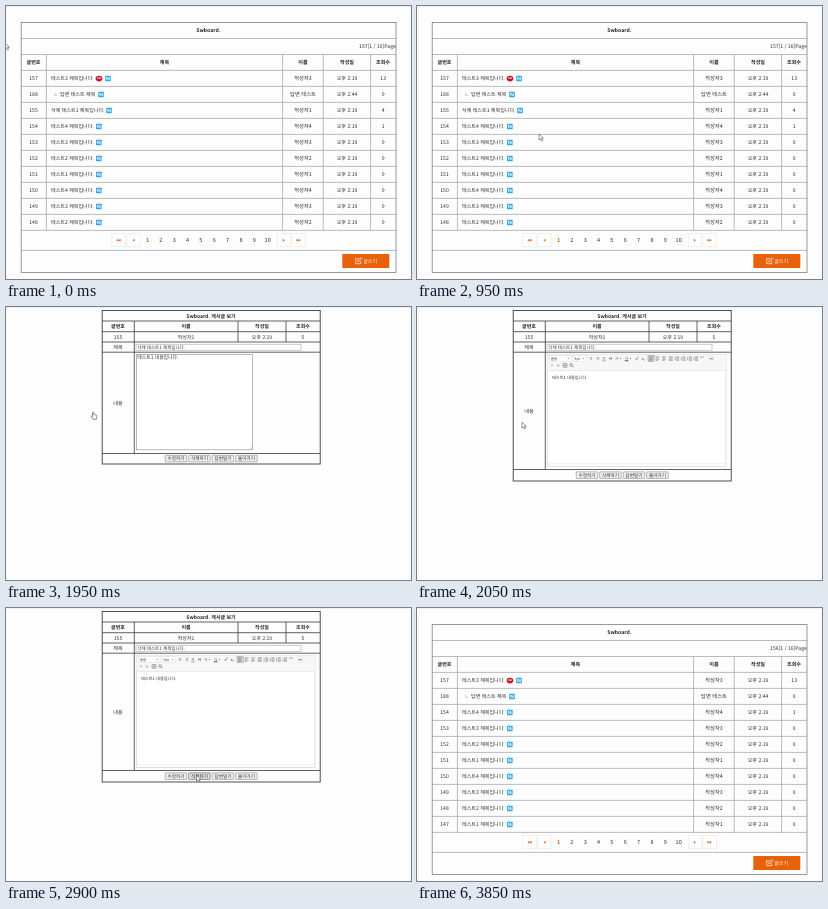
An HTML page for the animation above (4650 ms loop, 405x273 px).

```html
<!DOCTYPE html>
<html lang="ko">
<head>
<meta charset="utf-8">
<title>Board</title>
<style>
html, body { margin: 0; width: 100%; height: 100%; overflow: hidden; background: #fdfdfe; }
svg { display: block; width: 100vw; height: 100vh; }
text { font-family: 'Noto Sans CJK KR', 'Noto Sans CJK JP', 'Noto Sans', sans-serif; text-rendering: geometricPrecision; white-space: pre; }
</style>
</head>
<body>
<svg id="stage" viewBox="0 0 405 273" xmlns="http://www.w3.org/2000/svg"></svg>
<script>
const LOOP = 4650, STEP = 50;
const ORANGE = '#e8620c', INK = '#2e2e2e', GRID = '#a6a6a6', DARK = '#3c3c3c';
const svg = document.getElementById('stage');

const rect = (x, y, w, h, fill, stroke = 'none', extra = '') =>
  `<rect x="${x}" y="${y}" width="${w}" height="${h}" fill="${fill}" stroke="${stroke}" ${extra}/>`;
const path = (d, stroke, width = 0.7, fill = 'none') =>
  `<path d="${d}" stroke="${stroke}" stroke-width="${width}" fill="${fill}"/>`;
const text = (x, y, s, { size = 5.1, fill = INK, anchor = 'middle', weight = 400 } = {}) =>
  `<text x="${x}" y="${y + size * 0.36}" font-size="${size}" fill="${fill}" text-anchor="${anchor}" font-weight="${weight}">${s}</text>`;
const left = (x, y, s, size = 5.05) => text(x, y, s, { size, anchor: 'start' });
const bold = (x, y, s, size = 5.1) => text(x, y, s, { size, weight: 700, fill: '#222' });
const hLines = (x1, x2, ys) => ys.map(y => `M${x1} ${y}H${x2}`).join('');
const vLines = (y1, y2, xs) => xs.map(x => `M${x} ${y1}V${y2}`).join('');

// List page
const newBadge = (x, y) => rect(x - 2.8, y - 2.5, 5.6, 5.6, '#35a8e6', 'none', 'rx="0.5"') +
  path(`M${x - 1.2} ${y + 1.7}v-2.9l2.4 2.9v-2.9`, '#fff', 0.8);
const hotBadge = (x, y) => `<ellipse cx="${x}" cy="${y + 0.4}" rx="3.4" ry="2.8" fill="#c4142c"/>` +
  text(x, y + 0.3, 'Hot', { size: 2.6, fill: '#fff', weight: 700 });

const plainPost = (id, n, views = 0) =>
  ({ id, title: `테스트${n} 제목입니다.`, author: `작성자${n}`, time: '2:19', views, badge: 92.8 });
const posts = [
  { ...plainPost(157, 3, 13), hot: true, badge: 102 },
  { id: 188, title: '답변 테스트 제목', author: '답변 테스트', time: '2:44', views: 0, reply: true, badge: 95 },
  { ...plainPost(155, 1, 4), title: '삭제 테스트1 제목입니다.', badge: 103 },
  plainPost(154, 4, 1),
  ...[3, 2, 1, 4, 3, 2, 1].map((n, i) => plainPost(153 - i, n))
];

function postRow(p, i) {
  const y = 72.2 + i * 16;
  let out = text(27.5, y, p.id) + left(p.reply ? 54 : 45, y, p.title) + newBadge(p.badge, y);
  if (p.hot) out += hotBadge(93, y);
  if (p.reply) out += path(`M48.7 ${y - 1.2}v2.4h2.6`, '#999', 0.5);
  return out + text(297, y, p.author, { size: 5.3 }) + text(341, y, `오후 ${p.time}`) + text(377.2, y, p.views);
}

function pager() {
  const arrow = (x, dir) => `M${x + dir} 234.2l${-dir * 2} -1.5v3z`;
  const button = (x, dir, count) => {
    const d = count > 1 ? arrow(x - 1.1, dir) + arrow(x + 1.1, dir) : arrow(x, dir);
    return rect(x - 6.6, 227.4, 13.2, 13.4, '#fff', '#e6e6e6', 'stroke-width="0.6"') + path(d, 'none', 0, ORANGE);
  };
  let out = button(112.5, -1, 2) + button(127.5, -1, 1) + button(277.8, 1, 1) + button(292.6, 1, 2);
  for (let n = 1; n <= 10; n++) {
    out += text(141.5 + (n - 1) * 13.35, 234, n, { size: 5.5, fill: n === 1 ? ORANGE : INK, weight: n === 1 ? 700 : 400 });
  }
  return out;
}

function listPage(total, rows) {
  const ys = [32.5, 48.5];
  for (let i = 0; i <= 10; i++) ys.push(64.4 + i * 16);
  ys.push(244.4);
  const heads = [['글번호', 27.5], ['제목', 158.4], ['이름', 297], ['작성일', 341], ['조회수', 377]];
  return path(hLines(15, 390, ys) + vLines(48.5, 224.4, [40.4, 276.6, 317.2, 364.6]), GRID, 0.75) +
    rect(15.2, 16.4, 374.8, 250, 'none', '#808080', 'stroke-width="0.8"') +
    bold(202.3, 24.3, 'Swboard.') +
    text(389.8, 40.3, `${total}[1 / 16]Page`, { anchor: 'end' }) +
    heads.map(([s, x]) => bold(x, 56.3, s)).join('') +
    rows.map(postRow).join('') + pager() +
    rect(336.3, 247.9, 47, 14.2, ORANGE, 'none', 'rx="0.6"') +
    path('M353 252.7h-3.3v5h5v-2.6M351.7 255.9l.3-1.3 3-3 .9.9-3 3z', '#fff', 0.65) +
    text(364.1, 255, '글쓰기', { size: 5, fill: '#fff' });
}

// View page
function toolbar() {
  const t = (x, y, s, size = 3.6) => text(x, y, s, { size, fill: '#444' });
  const bars = (x, y, widths) => widths.map((w, i) => `M${x} ${y - 1.8 + i * 1.2}h${w}`).join('');
  const drop = x => `M${x} 51l1.6 0-.8 1z`;
  const combo = (x, w, s) => rect(x, 48.6, w, 6, '#fff', '#d5d5d5', 'stroke-width="0.4"') + left(x + 1.5, 51.6, s, 3.4);
  let out = rect(130.5, 47.5, 178.5, 16, '#f7f7f7') + combo(132.5, 21.5, '돋움') + combo(156, 13.5, '9pt');
  out += path([150.5, 165.8, 202.6, 212.6].map(drop).join(''), 'none', 0, '#555');
  out += t(174, 51.5, '가') + t(180.4, 51.5, '<tspan font-style="italic">가</tspan>') +
    t(187, 51.5, '가') + t(193.5, 51.5, '가') + t(199.7, 51.5, '가') + t(209.5, 51.5, '가') +
    t(220.2, 51.5, 'x²', 4) + t(226.3, 51.5, 'x₂', 4);
  out += path('M185.3 53.8h3.4M191.8 51.6h3.4', '#444', 0.4) + rect(207.8, 53.4, 3.6, 0.8, '#333');
  out += rect(231, 48.5, 6.2, 6.2, '#d3d3d3', '#888', 'stroke-width="0.4"');
  let lines = '';
  [232.2, 238.7, 245.2, 251.7].forEach((x, i) => lines += bars(x, 51.6, i === 3 ? [4, 4, 4, 4] : [4, 2.6, 4, 2.6]));
  [258, 264.3, 270.6, 276.9].forEach(x => lines += bars(x + 1.2, 51.6, [3, 3, 3, 3]) + `M${x} 50v3.4`);
  out += path(lines, '#555', 0.45);
  out += t(285, 51.6, '“”', 4.6) + path('M292 48.6h4.5v6h-4.5z', '#ddd', 0.4) + t(294.2, 51.6, '∞');
  out += t(135, 58.4, '❝', 3.4) + t(141, 58.4, '※', 3.6) +
    path('M146 56.5h4v3.8h-4zM146 58.4h4M148 56.5v3.8', '#666', 0.45) +
    `<circle cx="154" cy="58" r="1.4" fill="none" stroke="#555" stroke-width="0.5"/>` +
    path('M155 59l1.3 1.4', '#555', 0.6);
  return out + path('M130.5 63.5H309', '#d8d8d8', 0.5);
}

function viewPage(rich) {
  const foot = rich ? 162.5 : 146.5, end = rich ? 174 : 157;
  let out = rect(96.2, 3.5, 218, end - 3.5, 'none', DARK, 'stroke-width="0.9"') +
    path(hLines(96, 314, [14, 24.7, 35, 45.2, foot]) + vLines(14, 35, [232, 280]) + vLines(14, foot, [128.3]), DARK, 0.8);
  out += bold(205, 8.9, 'Swboard. 게시글 보기', 5);
  [['글번호', '155', 112], ['이름', '작성자1', 180], ['작성일', '오후 2:19', 256], ['조회수', '5', 297]]
    .forEach(([head, val, x]) => out += bold(x, 19.4, head, 5) + text(x, 29.9, val, { size: 5 }));
  out += text(112, 40.1, '제목') + text(112, (45.2 + foot) / 2, '내용');
  out += rect(130, 37.2, 165, 6, '#fff', '#999', 'stroke-width="0.5"') + left(131.3, 40.2, '삭제 테스트1 제목입니다.', 4.5);
  if (rich) {
    out += rect(130.5, 47.5, 178.5, 112, '#fff', '#c4c4c4', 'stroke-width="0.5"') + toolbar() +
      left(135, 70.7, '테스트1 내용입니다.', 4.2) + path('M130.5 156.8H309', '#dcdcdc', 0.5);
  } else {
    out += rect(130.3, 47.3, 116, 95.5, '#fff', '#8a8a8a', 'stroke-width="0.6"') +
      left(131.3, 50, '테스트1 내용입니다.', 4.85) + path('M243.4 142.2l2.3-2.3M244.8 142.2l.9-.9', '#999', 0.4);
  }
  const mid = (foot + end) / 2 - 0.1;
  ['수정하기', '삭제하기', '답변달기', '돌아가기'].forEach((s, i) => {
    const x = 159.2 + i * 23.5;
    out += rect(x, mid - 3.3, 21.5, 6.6, '#efefef', '#777', `stroke-width="0.5" rx="0.6" ${rich && i === 1 ? 'id="del"' : ''}`) +
      text(x + 10.75, mid, s, { size: 4.6 });
  });
  return out;
}

const cursors = {
  arrow: path('M0 0v6l1.4-1.2 1 2.2 1.1-.5-1-2.1h1.9z', '#333', 0.5, '#fff'),
  hand: path('M1.5 3.9V.8q.6-.9 1.2 0v2.1l2.5.6q.8.3.7 1.2l-.6 2.9H2L.1 4.9q.4-1 1.4 0z', '#333', 0.55, '#fff'),
  beam: path('M-1.3-2.8h2.6M0-2.8v5.6M-1.3 2.8h2.6', '#444', 0.6)
};

const pages = {
  before: listPage(157, posts.slice(0, 10)),
  plain: viewPage(false),
  rich: viewPage(true),
  after: listPage(156, posts.filter(p => p.id !== 155))
};
const group = (name, body) => `<g id="${name}" display="none">${body}</g>`;
svg.innerHTML = rect(0, 0, 405, 273, '#fdfdfe') + rect(0, 0, 405, 0.8, '#e4f2f8') +
  Object.entries(pages).map(([k, v]) => group(k, v)).join('') +
  Object.entries(cursors).map(([k, v]) => group(k, v)).join('');
const el = id => document.getElementById(id);
const show = (id, on) => el(id).setAttribute('display', on ? 'inline' : 'none');

// Pointer stops: time, x, y
const stops = [
  [0, -1, 37], [50, 2, 39], [200, 48, 76], [350, 100, 116], [500, 122, 128], [950, 122, 128],
  [1050, 149, 134], [1200, 98, 118], [1300, 47, 110], [1400, 84, 106], [1450, 98, 105],
  [1500, 85, 104.6], [1950, 85, 104.6], [2050, 105, 115], [2200, 154, 137], [2300, 171, 145],
  [2450, 188, 164], [2500, 189, 166], [2650, 190.5, 167], [2900, 190.5, 167], [3000, 166, 152],
  [3150, 102, 118], [3250, 81, 108], [3300, 79, 106], [3400, 70, 96], [3600, 45, 68], [3800, 21, 41]
];

function pointerAt(t) {
  const i = stops.findIndex(s => s[0] > t);
  if (i < 0) return stops[stops.length - 1].slice(1);
  const [t0, x0, y0] = stops[i - 1], [t1, x1, y1] = stops[i];
  const k = (t - t0) / (t1 - t0);
  return [x0 + (x1 - x0) * k, y0 + (y1 - y0) * k];
}

const within = (x, y, x1, y1, x2, y2) => x >= x1 && x <= x2 && y >= y1 && y <= y2;

function pageAt(t) {
  if (t < 1950) return 'before';
  if (t < 2050) return 'plain';
  return t < 2950 ? 'rich' : 'after';
}

function cursorAt(t, page, x, y) {
  if (t >= 3850) return null;
  if (t >= 1400 && t < 2000) return 'hand';
  return page === 'rich' && within(x, y, 130, 64, 309, 157) ? 'beam' : 'arrow';
}

function draw(ms) {
  const t = Math.floor((ms % LOOP) / STEP) * STEP;
  const page = pageAt(t), [x, y] = pointerAt(t), cursor = cursorAt(t, page, x, y);
  Object.keys(pages).forEach(k => show(k, k === page));
  Object.keys(cursors).forEach(k => show(k, k === cursor));
  if (cursor) el(cursor).setAttribute('transform', `translate(${x} ${y})`);
  const over = within(x, y, 182.7, 164.9, 204.2, 171.5);
  el('del').setAttribute('fill', over ? '#dedede' : '#efefef');
  el('del').setAttribute('stroke', over ? '#444' : '#777');
}

const start = performance.now();
function tick() {
  draw(performance.now() - start);
  requestAnimationFrame(tick);
}
tick();
</script>
</body>
</html>
```
